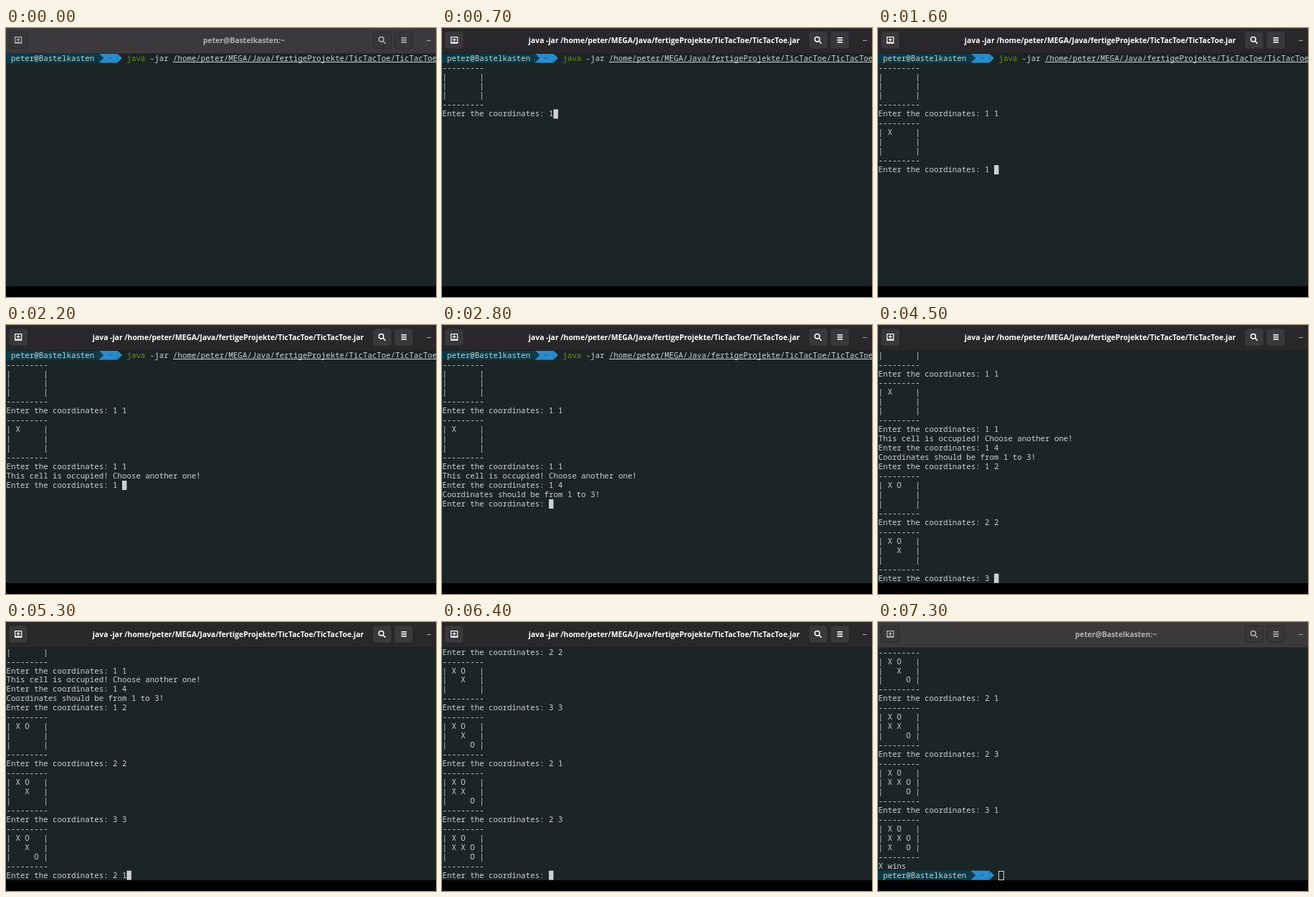
An HTML page with a canvas that plays this animation: 600x375 px, repeating every 7.4 s.

```html
<!DOCTYPE html>
<html lang="en">
<head>
<meta charset="utf-8">
<title>Tic-tac-toe in a terminal</title>
<style>
  html, body { margin: 0; width: 100%; height: 100%; overflow: hidden; background: #000; }
  canvas { display: block; }
</style>
</head>
<body>
<canvas id="stage" width="600" height="375"></canvas>
<script>
const ctx = document.getElementById("stage").getContext("2d");

const LOOP = 7400, TOP = 36, BOTTOM = 360, ROWS = 25;
const CELL_W = 6.46, CELL_H = 12.96, LEFT = 0.5, FIRST_ROW = 35.6;
const INK = "#ccd1d0", PAPER = "#1c2526", TEAL = "#083a47", BLUE = "#2b8bcb";

const USER = "peter@Bastelkasten";
const JAR = "/home/peter/MEGA/Java/fertigeProjekte/TicTacToe/TicTacToe.jar";
const ASK = "Enter the coordinates: ";

const FOCUS_IN = 100, LAUNCH = 300, FIRST_BOARD = 500, EXIT = 7100, FOCUS_OUT = 7300;
const KEY_GAP = 100;
const turns = [
  { keys: "1 1", start: 700, enter: 1100 },
  { keys: "1 1", start: 1500, enter: 1900, error: "This cell is occupied! Choose another one!" },
  { keys: "1 4", start: 2100, enter: 2600, error: "Coordinates should be from 1 to 3!" },
  { keys: "1 2", start: 2900, enter: 3300 },
  { keys: "2 2", start: 3600, enter: 4000 },
  { keys: "3 3", start: 4400, enter: 4800 },
  { keys: "2 1", start: 5000, enter: 5500 },
  { keys: "2 3", start: 5800, enter: 6300 },
  { keys: "3 1", start: 6600, enter: EXIT }
];

function boardLines(cells) {
  const rule = "-".repeat(9);
  return [rule, ...cells.map(row => `| ${row.join(" ")} |`), rule];
}

// Everything the terminal has printed at time t, plus the cursor column.
function session(t) {
  const lines = [{ prompt: true, command: true }];
  if (t < LAUNCH) return { lines, col: 97 };
  if (t < FIRST_BOARD) return { lines: [...lines, ""], col: 0 };

  const cells = [0, 1, 2].map(() => [" ", " ", " "]);
  let mark = "X";
  lines.push(...boardLines(cells));
  for (const { keys, start, enter, error } of turns) {
    const typed = Math.max(0, Math.floor((t - start) / KEY_GAP) + 1);
    const line = ASK + keys.slice(0, typed);
    lines.push(line);
    if (t < enter) return { lines, col: line.length };
    if (error) {
      lines.push(error);
    } else {
      const [row, col] = keys.split(" ").map(Number);
      cells[row - 1][col - 1] = mark;
      mark = mark === "X" ? "O" : "X";
      lines.push(...boardLines(cells));
    }
  }
  lines.push("X wins", { prompt: true });
  return { lines, col: 26 };
}

const colX = col => LEFT + col * CELL_W;
const rowY = row => FIRST_ROW + row * CELL_H;

function box(x, y, w, h, color) {
  ctx.fillStyle = color;
  ctx.fillRect(x, y, w, h);
}

function print(text, col, row, color = INK) {
  ctx.fillStyle = color;
  ctx.font = '500 10.77px "Noto Sans Mono", "DejaVu Sans Mono", monospace';
  ctx.textAlign = "left";
  ctx.textBaseline = "alphabetic";
  [...text].forEach((ch, i) => ctx.fillText(ch, colX(col + i), rowY(row) + 10));
}

function arrow(col, row, color) {
  const x = colX(col), y = rowY(row);
  ctx.fillStyle = color;
  ctx.beginPath();
  ctx.moveTo(x, y);
  ctx.lineTo(x + CELL_W, y + CELL_H / 2);
  ctx.lineTo(x, y + CELL_H);
  ctx.fill();
}

function drawPrompt(row, withCommand) {
  const y = rowY(row);
  box(0, y, colX(20), CELL_H, TEAL);
  box(colX(20), y, 4 * CELL_W, CELL_H, BLUE);
  arrow(20, row, TEAL);
  arrow(24, row, BLUE);
  print(USER, 1, row);
  print("~", 22, row, "#164a68");
  if (!withCommand) return;
  print("java", 26, row, "#6f9410");
  print("-jar", 31, row);
  print(JAR, 36, row);
  box(colX(36), Math.round(y + 11), JAR.length * CELL_W, 1, INK);
}

function drawTerminal(t, focused) {
  box(0, TOP, 600, BOTTOM - TOP, PAPER);
  const { lines, col } = session(t);
  const visible = lines.slice(-ROWS);
  visible.forEach((line, row) => {
    if (line.prompt) drawPrompt(row, line.command);
    else print(line, 0, row);
  });

  const x = colX(col), y = rowY(visible.length - 1);
  if (focused) {
    box(x, y, CELL_W, CELL_H, INK);
  } else {
    ctx.strokeStyle = INK;
    ctx.lineWidth = 1;
    ctx.strokeRect(Math.round(x) + 0.5, Math.round(y) + 0.5, 7, 12);
  }
}

function button(x, w, fill, border) {
  ctx.beginPath();
  ctx.roundRect(x + 0.5, 5.5, w, 23, 3);
  ctx.fillStyle = fill;
  ctx.fill();
  ctx.strokeStyle = border;
  ctx.lineWidth = 1;
  ctx.stroke();
}

function drawHeader(t, focused) {
  const [bar, fill, border, ink] = focused
    ? ["#292729", "#3a383a", "#343234", "#ffffff"]
    : ["#3b393b", "#383638", "#2b292b", "#b4b2b2"];
  box(0, 0, 600, TOP, bar);
  box(0, 0, 600, 1, focused ? "#363535" : "#434143");
  box(0, TOP - 1, 600, 1, focused ? "#1f1e1f" : "#2b292b");
  button(4, 25, fill, border);
  button(512, 25, fill, border);
  button(542, 25, fill, border);

  // New tab
  ctx.strokeStyle = ink;
  ctx.lineWidth = 1.2;
  ctx.strokeRect(12.6, 12.6, 9, 7.6);
  box(12, 20, 10.2, 1.8, ink);
  box(14.6, 15.8, 5, 1.2, ink);
  box(16.5, 13.9, 1.2, 5, ink);

  // Search
  ctx.lineWidth = 1.6;
  ctx.beginPath();
  ctx.arc(523.6, 15.8, 3.3, 0, 2 * Math.PI);
  ctx.moveTo(526, 18.2);
  ctx.lineTo(529.6, 21.8);
  ctx.stroke();

  // Menu and minimise
  for (const y of [13, 16, 19]) box(551.5, y, 7.5, 1.6, ink);
  box(587, 17, 6, 1, "#a4a2a2");

  const running = t >= LAUNCH && t < EXIT;
  ctx.fillStyle = ink;
  ctx.font = 'bold 10.4px "Open Sans", "Noto Sans", sans-serif';
  ctx.textAlign = "center";
  ctx.textBaseline = "alphabetic";
  ctx.fillText(running ? `java -jar ${JAR}` : `${USER}:~`, running ? 310 : 332, 21);
}

function draw(now) {
  const t = now % LOOP;
  const focused = t >= FOCUS_IN && t < FOCUS_OUT;
  box(0, 0, 600, 375, "#000");
  drawTerminal(t, focused);
  drawHeader(t, focused);
  box(0, BOTTOM, 600, 15, "#000");
}

const began = performance.now();
function tick() {
  draw(performance.now() - began);
  requestAnimationFrame(tick);
}
tick();
</script>
</body>
</html>
```
